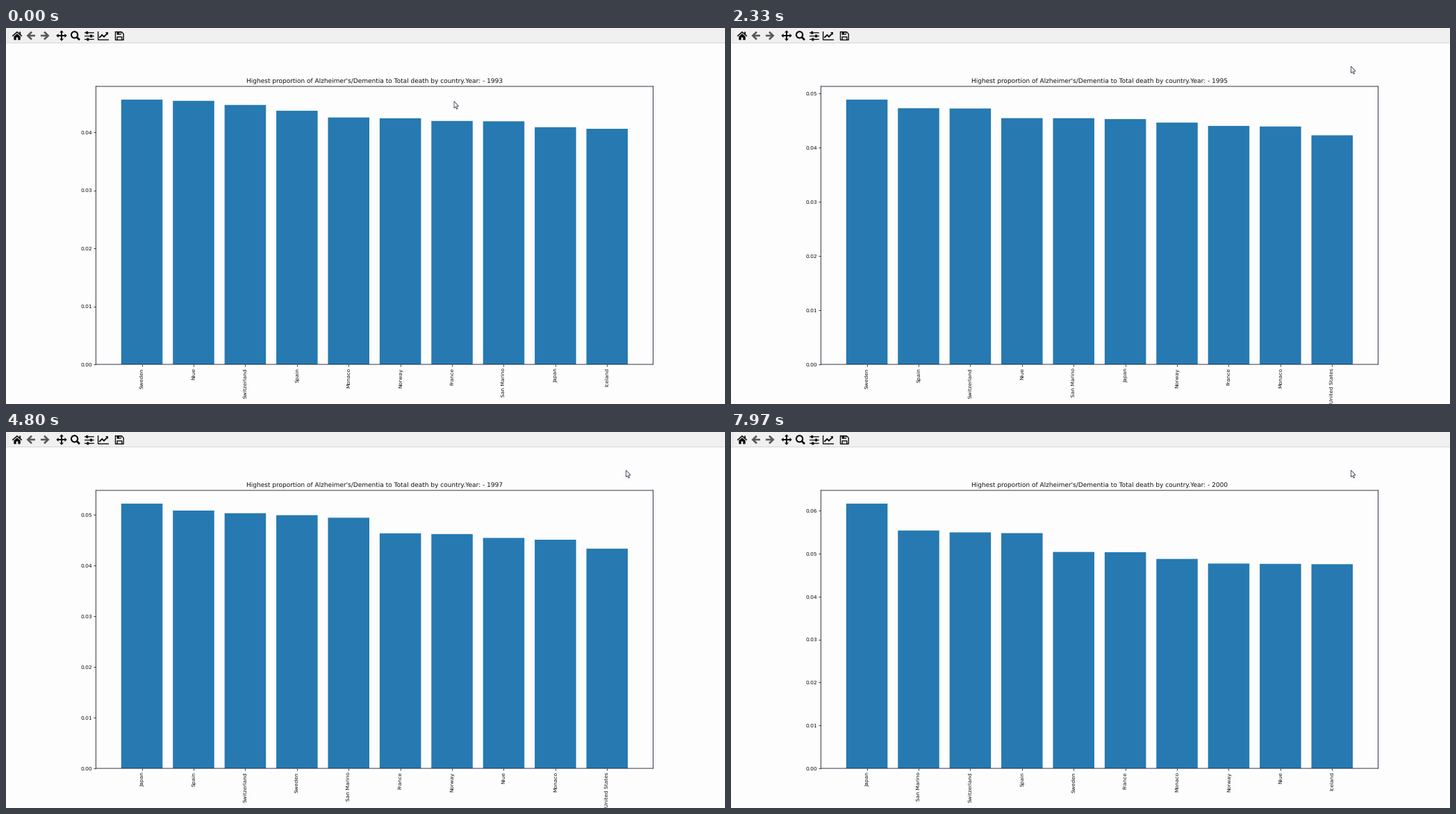
A matplotlib script for the animation above (8 s loop, 1035 by 541 pixels).

```python
import numpy as np
import matplotlib.pyplot as plt
from matplotlib.animation import FuncAnimation
from matplotlib.patches import Circle, Polygon, Rectangle
from matplotlib.ticker import MultipleLocator

W, H, DPI = 1035, 541, 64
PX = 72 / DPI                      # points per pixel
LOOP, STEP = 8000, 40
FIRST, PERIOD = 770, 1040          # first change of year, time per year
START, BARS = 1993, 10
PAPER, BLUE, LINE = "#fdfdfd", "#267ab1", "#14142c"
INK, GREY, PANEL = "#0c0c0c", "#585858", "#f0f0f0"

# Turning points of each trend: (years since START, share in 1/100000)
TRENDS = {
    "Sweden": [(0, 4566), (1, 4795), (3, 4980), (7, 5040)],
    "Niue": [(0, 4545), (4, 4546), (6, 5030), (7, 4763)],
    "Switzerland": [(0, 4474), (1, 4691), (2, 4724), (7, 5496)],
    "Spain": [(0, 4374), (1, 4588), (3, 4870), (4, 5086), (6, 5251), (7, 5479)],
    "Monaco": [(0, 4258), (1, 4233), (3, 4550), (4, 4511), (6, 4658), (7, 4878)],
    "Norway": [(0, 4244), (3, 4573), (7, 4770)],
    "France": [(0, 4198), (3, 4504), (7, 5034)],
    "San Marino": [(0, 4192), (1, 4629), (3, 4460), (4, 4945), (5, 4880),
                   (7, 5540)],
    "Japan": [(0, 4090), (2, 4528), (4, 5223), (6, 5765), (7, 6166)],
    "Iceland": [(0, 4063), (5, 4380), (7, 4755)],
    "United States": [(0, 4060), (3, 4313), (7, 4400)],
}


def ranking(year):
    """Top countries of one year as (share, name), highest first."""
    shares = [(np.interp(year, *zip(*keys)) / 1e5, name)
              for name, keys in TRENDS.items()]
    return sorted(shares, reverse=True)[:BARS]


plt.rcParams.update({"font.family": "DejaVu Sans", "text.hinting": "none",
                     "toolbar": "None"})
fig = plt.figure(figsize=(W / DPI, H / DPI), dpi=DPI, facecolor=PAPER)

# Bar chart
ax = fig.add_axes([0.125, 57 / H, 0.775, 400 / H], facecolor=PAPER)
bars = ax.bar(range(BARS), [0.01] * BARS, color=BLUE, snap=False)
ax.set_xlim(-0.89, BARS - 0.11)
ax.yaxis.set_major_locator(MultipleLocator(0.01))
ax.yaxis.set_major_formatter("{x:.2f}")
ax.set_xticks(range(BARS), [""] * BARS, rotation=90)
ax.tick_params(labelsize=7.49 * PX, length=2.7 * PX, width=0.8 * PX,
               pad=2.6 * PX, color=LINE, labelcolor="#101010")
for spine in ax.spines.values():
    spine.set(linewidth=0.85 * PX, color=LINE, snap=False)
title = ax.set_title("", fontsize=8.98 * PX, pad=4.5 * PX, color="#101010")

# Pixel layer for the toolbar and the pointer
ui = fig.add_axes([0, 0, 1, 1])
ui.set(xlim=(0, W), ylim=(H, 0))
ui.axis("off")


def shape(points, color=INK):
    ui.add_patch(Polygon(points, facecolor=color, edgecolor="none"))


def rect(x, y, w, h, color=INK):
    ui.add_patch(Rectangle((x, y), w, h, facecolor=color, edgecolor="none",
                           snap=False))


def stroke(points, width, color=INK):
    xs, ys = zip(*points)
    ui.plot(xs, ys, color=color, lw=width * PX, solid_capstyle="butt",
            solid_joinstyle="miter", snap=False)


def arrow(cx, way):
    stroke([(cx - 6 * way, 11), (cx + 5 * way, 11)], 2.6, GREY)
    stroke([(cx - way, 5.6), (cx + 4.6 * way, 11), (cx - way, 16.4)], 2.7, GREY)


def toolbar():
    rect(0, 0, W, 21, PANEL)
    rect(0, 21, W, 1, "#d6d6d6")
    for y in range(3, 20, 3):
        rect(2.5, y, 1, 1, "#c4c4c4")

    # home
    stroke([(9.2, 11.7), (16, 5.8), (22.8, 11.7)], 1.6)
    rect(19.2, 5.5, 1.9, 4)
    shape([(11.3, 12.2), (16, 8.2), (20.7, 12.2), (20.7, 17.3), (17.3, 17.3),
           (17.3, 13.5), (14.7, 13.5), (14.7, 17.3), (11.3, 17.3)])

    arrow(36, -1)
    arrow(56, 1)

    # pan
    stroke([(75, 11), (85, 11)], 2)
    stroke([(80, 6), (80, 16)], 2)
    for dx, dy in [(1, 0), (-1, 0), (0, 1), (0, -1)]:
        x, y = 80 + 4.5 * dx, 11 + 4.5 * dy
        shape([(x + 3.2 * dx, y + 3.2 * dy), (x + 3 * dy, y + 3 * dx),
               (x - 3 * dy, y - 3 * dx)])

    # zoom
    ui.add_patch(Circle((98.6, 9.8), 4.6, fill=False, ec=INK, lw=2.1 * PX))
    stroke([(101.8, 13), (106, 17.2)], 2.8)

    # sliders
    for y, knob in [(6.8, 116.7), (11.6, 122.6), (16.4, 117.8)]:
        stroke([(113, y), (126.8, y)], 1.3)
        rect(knob - 1.5, y - 2, 3, 4)

    # line chart
    stroke([(132.6, 5), (132.6, 17), (148, 17)], 1.4)
    stroke([(134.3, 14), (138.3, 10), (141, 12.6), (146, 7.6)], 1.9)
    shape([(143, 5.7), (147.4, 5.7), (147.4, 10.1)])

    # save
    stroke([(157.5, 5.6), (166.3, 5.6), (169.2, 8.5), (169.2, 17.2),
            (157.5, 17.2), (157.5, 4.9)], 1.4)
    rect(159.6, 5.6, 6.2, 4.2)
    rect(163.4, 6.2, 1.5, 2.7, PANEL)
    stroke([(160, 17), (160, 12.8), (166.8, 12.8), (166.8, 17)], 1.4)


toolbar()

POINTER = np.array([(0, 0), (0, 9.8), (2.2, 7.8), (3.6, 11.2), (5.1, 10.6),
                    (3.7, 7.2), (6.6, 7)])
pointer = Polygon(POINTER, facecolor=PAPER, edgecolor="#48485e",
                  lw=0.9 * PX, zorder=5)
ui.add_patch(pointer)


def pointer_spot(t):
    times = [1150, 1460, 2000]
    return (np.interp(t, times, [645, 682.5, 892.5]),
            np.interp(t, times, [105.5, 71, 55]))


def update(i):
    t = i * STEP
    year = 0 if t < FIRST else 1 + (t - FIRST) // PERIOD
    shares, names = zip(*ranking(year))
    for bar, share in zip(bars, shares):
        bar.set_height(share)
    ax.set_ylim(0, 1.05 * shares[0])
    ax.set_xticklabels(names)
    title.set_text("Highest proportion of Alzheimer's/Dementia to Total death "
                   f"by country.Year: - {START + year}")
    pointer.set_xy(POINTER + pointer_spot(t))
    return [*bars, title, pointer]


anim = FuncAnimation(fig, update, frames=LOOP // STEP, interval=STEP,
                     repeat=True, repeat_delay=0, blit=False)
plt.show()
```
